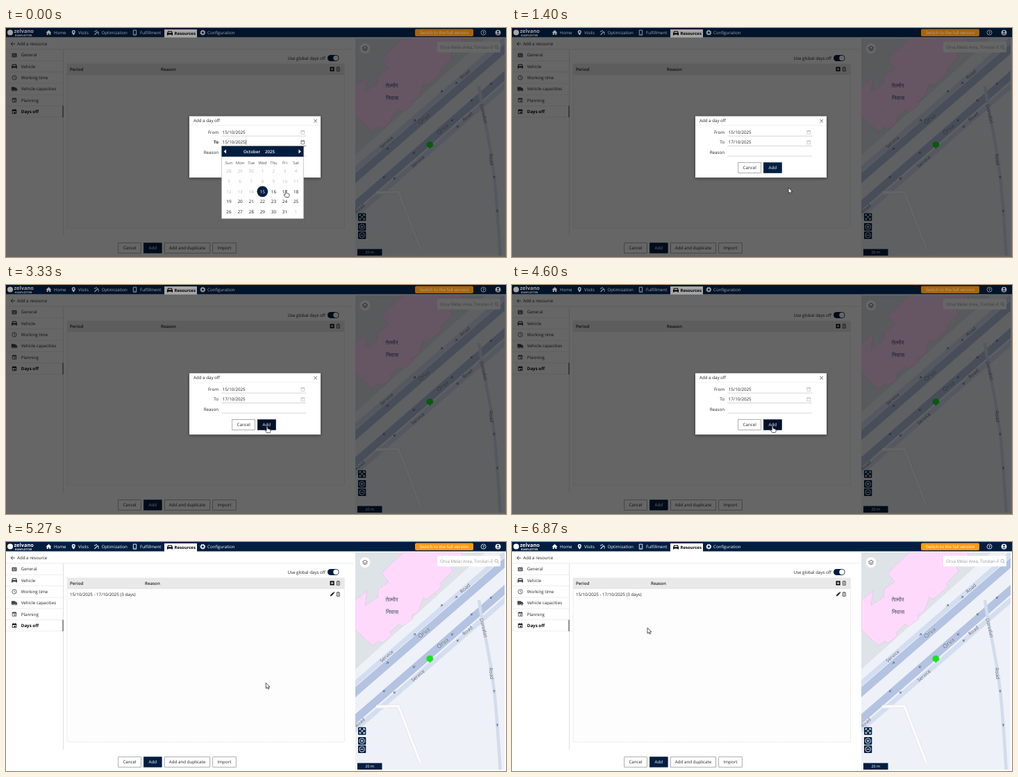
An HTML page for the animation above (8 s loop, 720x331 px).

```html
<!DOCTYPE html>
<html lang="en">
<head>
<meta charset="utf-8">
<title>Days off</title>
<style>
html, body { margin: 0; width: 100%; height: 100%; overflow: hidden; background: #fff; }
svg { display: block; width: 100%; height: 100%; }
text { font-family: "Open Sans", "Noto Sans", sans-serif; text-rendering: geometricPrecision; white-space: pre; }
</style>
</head>
<body>
<svg id="stage" viewBox="0 0 720 331">
  <defs>
    <clipPath id="mapClip"><rect x="503" y="15" width="215" height="314"/></clipPath>
    <clipPath id="searchClip"><rect x="621" y="20" width="80" height="16"/></clipPath>
    <filter id="soft" x="-10%" y="-20%" width="120%" height="140%"><feGaussianBlur stdDeviation="2"/></filter>
  </defs>
</svg>
<script>
const NS = 'http://www.w3.org/2000/svg';
const NAVY = '#011e41', INK = '#222';
const stage = document.getElementById('stage');

function el(parent, tag, attrs = {}) {
  const node = document.createElementNS(NS, tag);
  for (const key in attrs) node.setAttribute(key, attrs[key]);
  parent.appendChild(node);
  return node;
}
const group = (parent, attrs) => el(parent, 'g', attrs);
const rect = (p, x, y, width, height, fill, more) => el(p, 'rect', { x, y, width, height, fill, ...more });
const circle = (p, cx, cy, r, fill, more) => el(p, 'circle', { cx, cy, r, fill, ...more });
const path = (p, d, fill, more) => el(p, 'path', { d, fill, ...more });
const stroke = (p, d, color, width = 0.7, more) =>
  path(p, d, 'none', { stroke: color, 'stroke-width': width, ...more });

// y is the visual middle of the line
function text(p, x, y, str, { size = 6.2, fill = INK, ...more } = {}) {
  const node = el(p, 'text', { x, y: y + size * 0.36, 'font-size': size, fill, ...more });
  node.textContent = str;
  return node;
}
const mid = { 'text-anchor': 'middle' };
const end = { 'text-anchor': 'end' };
const bold = { 'font-weight': 700 };
const semi = { 'font-weight': 600 };

function button(p, x, y, w, h, label, solid) {
  const box = rect(p, x + 0.25, y + 0.25, w - 0.5, h - 0.5, solid ? NAVY : '#fff',
    { stroke: solid ? NAVY : '#777', 'stroke-width': 0.6 });
  text(p, x + w / 2, y + h / 2, label, { fill: solid ? '#fff' : INK, ...mid });
  return box;
}
function trash(p, x, y) {
  stroke(p, `M${x - 2.6} ${y - 2.2}h5.2M${x - 1} ${y - 3}h2M${x - 2} ${y - 1.6}v4.5h4v-4.5M${x} ${y - 1}v3`, '#333', 0.8);
}
function calIcon(p, x, y, color) {
  return stroke(p, `M${x - 2.4} ${y - 2}h4.8v4.8h-4.8zM${x - 2.4} ${y - 1}h4.8M${x - 1.3} ${y - 3}v1M${x + 1.3} ${y - 3}v1`, color, 0.55);
}
function car(p, x, y, fill) {
  path(p, `M${x - 4} ${y + 3}v-3.2l1.3-3h5.4l1.3 3v3.2h-1.5v-1h-5v1zM${x - 2.7} ${y - 0.4}h5.4l-.8-1.7h-3.8z`, fill, { 'fill-rule': 'evenodd' });
}

/* ---------- page ---------- */
const page = group(stage);
rect(page, 0, 0, 720, 331, '#fff');

function buildNav(p) {
  rect(p, 0, 0, 720, 13.5, NAVY);
  circle(p, 6, 6.5, 4, '#fff');
  text(p, 11.5, 4.6, 'zelvano', { size: 7.4, fill: '#fff', ...bold });
  text(p, 13, 10.5, 'RUNPLOTTER', { size: 3.7, fill: '#fff', ...bold });
  rect(p, 228, 2, 47, 12, '#fff');
  const items = [[69, 'Home'], [104, 'Visits'], [137.5, 'Optimization'], [193, 'Fulfillment'], [290, 'Configuration']];
  for (const [x, label] of items) text(p, x, 6.7, label, { fill: '#fff', 'font-weight': 500 });
  text(p, 242.5, 7.5, 'Resources', { size: 6, fill: '#000', ...bold });
  path(p, 'M57.5 6.8l4-3.8 4 3.8h-1.2v3.2h-2v-2.3h-1.6v2.3h-2v-3.2z', '#fff');
  path(p, 'M97.3 10.6c-4-4.4-2.8-7.6 0-7.6s4 3.2 0 7.6zM97.3 4.6a1.1 1.1 0 1 0 .1 0z', '#fff', { 'fill-rule': 'evenodd' });
  stroke(p, 'M127.5 9.8l5-5M130 3v2M134 6.8h-2M127 5h2M133 9.5v-1.5', '#fff', 1.1);
  stroke(p, 'M183.3 3.2h4.4v7h-4.4zM184.8 9h1.4', '#fff', 0.9);
  car(p, 236, 7.6, '#000');
  circle(p, 283.3, 6.7, 2.4, 'none', { stroke: '#fff', 'stroke-width': 1.5 });
  circle(p, 283.3, 6.7, 3.5, 'none', { stroke: '#fff', 'stroke-width': 0.9, 'stroke-dasharray': '1.4 1.35' });
  rect(p, 589, 1.5, 84, 10.6, '#ff9b13', { rx: 2 });
  text(p, 631, 6.7, 'Switch to the full version', { fill: '#fff', ...mid });
  circle(p, 687.5, 6.6, 3.5, 'none', { stroke: '#fff', 'stroke-width': 0.8 });
  text(p, 687.5, 6.6, '?', { size: 5.6, fill: '#fff', ...bold, ...mid });
  circle(p, 708.5, 6.6, 3.9, '#fff');
  circle(p, 708.5, 5.4, 1.3, NAVY);
  path(p, 'M706 9a2.6 1.8 0 0 1 5 0z', NAVY);
}

function buildMenu(p) {
  stroke(p, 'M12.8 23h-5.6M9.8 20.3l-2.7 2.7 2.7 2.7', '#222', 0.8);
  text(p, 16, 23.2, 'Add a resource');
  rect(p, 0, 30.5, 500, 0.6, '#ddd');
  rect(p, 82, 31, 0.6, 269, '#ccc');
  const names = ['General', 'Vehicle', 'Working time', 'Vehicle capacities', 'Planning', 'Days off'];
  names.forEach((name, i) => {
    const y = 39.2 + i * 16.27;
    text(p, 21.8, y, name, i === 5 ? { fill: '#000', ...bold } : {});
    rect(p, 0, y + 8, 82, 0.6, '#e2e2e2');
  });
  rect(p, 81.5, 112.5, 1, 16.5, '#333');
  rect(p, 8.5, 36.4, 7, 5.8, '#555', { rx: 0.6 });
  stroke(p, 'M10 38.6h2M10 40.3h4M13 38.2h1.2', '#fff', 0.7);
  car(p, 12, 55.5, '#444');
  circle(p, 12, 71.8, 3.2, 'none', { stroke: '#444', 'stroke-width': 0.8 });
  stroke(p, 'M12 69.8v2.2l1.5 1', '#444', 0.7);
  path(p, 'M7.8 85.3h5v1h1.7l1.7 2v2.2h-8.4z', '#444');
  for (const x of [10, 14.2]) circle(p, x, 90.6, 1.1, '#444', { stroke: '#fff', 'stroke-width': 0.4 });
  for (const [y, c] of [[104.3, '#444'], [120.8, '#000']]) {
    stroke(p, `M9.2 ${y - 2.5}h5.6v5.4h-5.6zM10.5 ${y - 3.4}v1M13.5 ${y - 3.4}v1`, c, 0.8);
    rect(p, 9.2, y - 2.5, 5.6, 1.6, c);
    rect(p, 11.5, y + 0.3, 2, 1.7, c);
  }
}

function buildTable(p) {
  text(p, 460, 43.4, 'Use global days off', end);
  rect(p, 463, 39, 16.5, 9, NAVY, { rx: 4.5 });
  circle(p, 475, 43.5, 3.7, '#fff');
  rect(p, 88, 52, 399.5, 237, '#fdfdfd', { stroke: '#ccc', 'stroke-width': 0.6, 'stroke-dasharray': '1 1' });
  rect(p, 88, 52, 399.5, 15.2, '#e9e9e9');
  rect(p, 88, 66.8, 399.5, 0.6, '#d4d4d4');
  text(p, 92, 59.4, 'Period', semi);
  rect(p, 466.5, 56.3, 6.2, 6.2, '#111', { rx: 0.6 });
  stroke(p, 'M467.7 59.4h3.8M469.6 57.5v3.8', '#fff', 0.9);
  trash(p, 478.3, 59.4);
  button(p, 161.5, 310.5, 33, 15, 'Cancel');
  button(p, 198, 310.5, 26.5, 15, 'Add', true);
  button(p, 228, 310.5, 66, 15, 'Add and duplicate');
  button(p, 297.5, 310.5, 34, 15, 'Import');
}

function buildMap(p) {
  const m = group(p, { 'clip-path': 'url(#mapClip)' });
  rect(m, 503, 15, 215, 314, '#eef1f7');
  path(m, 'M503 15H690L503 184Z', '#dde3e6');
  path(m, 'M503 84L520 71L517 92L535 80L536 68L551 58L541 45L572 15H656L658 22L640 37L643 42L625 60L628 64L606 83L601 80L594 100L584 106L586 111L571 122L566 118L553 131L555 135L542 146L536 143L528 150L503 127Z',
    '#ffd9fb', { stroke: '#e6bfe4', 'stroke-width': 0.6 });
  // diagonal roads, given by their height at x = 602
  const slope = -0.87;
  const road = (y, color, w) => stroke(m, `M490 ${y - 112 * slope}L730 ${y + 128 * slope}`, color, w);
  road(118, '#d5def0', 7);
  road(185, '#d5def0', 7);
  road(131, '#b3c3e1', 11);
  road(170, '#b3c3e1', 11);
  stroke(m, 'M681 84Q685 112 692 146T703 215T712 335', '#d3dcec', 4.5);
  stroke(m, 'M533 238L565 237L597 320', '#dfe2e7', 5);
  stroke(m, 'M533 238L565 237L597 320', '#fbfbfb', 3.6);

  const arrow = (x, y, a) => stroke(m, 'M-2 0h4M.4 -1.6l1.6 1.6-1.6 1.6', '#5d6c8c', 0.8,
    { transform: `translate(${x} ${y}) rotate(${a})` });
  [[627, 92], [549, 175], [648, 80], [588, 134], [699, 33]].forEach(([x, y]) => arrow(x, y, -41));
  [[671, 104], [643, 133], [588, 180], [545, 215], [560, 217], [651, 142], [699, 80]].forEach(([x, y]) => arrow(x, y, 139));
  arrow(703, 216, -96);
  arrow(707.5, 265, -94);

  const label = (x, y, a, str, size = 7) => text(m, 0, 0, str,
    { size, fill: '#46536b', stroke: '#f4f6fa', 'stroke-width': 0.6, 'paint-order': 'stroke', transform: `translate(${x} ${y}) rotate(${a})`, ...mid });
  label(548, 165, -41, 'Service');
  label(601.5, 131, -41, 'Orva', 8.6);
  label(661, 67, -41, 'Road');
  label(593, 193, -41, 'Service');
  label(628.5, 146, -41, 'Orva', 8.6);
  label(664.5, 128, -41, 'Road');
  label(509.5, 261, -41, 'Road');
  label(688, 124, 76, 'Dorvalas');
  label(699, 190, 84, 'Road');
  const hindi = { size: 8.4, fill: '#45506a', 'font-family': '"Noto Sans", "Noto Sans Devanagari", sans-serif', ...mid };
  text(m, 555.5, 83, 'तेल्मोर', hindi);
  text(m, 556, 101, 'निवास', hindi);

  path(m, 'M610.3 174.2l-2.4-2.2-2.1-1.2.2-4.2 2.5-2h3.8l2.4 2 .2 4-2.2 1.4z', '#14e619', { stroke: '#0fbf14', 'stroke-width': 0.4 });

  circle(m, 517, 29.5, 8, '#fff', { stroke: '#ccc', 'stroke-width': 0.5 });
  stroke(m, 'M513.4 28.5l3.6-2.3 3.6 2.3-3.6 2.3zM513.4 30.6l3.6 2.3 3.6-2.3', '#444', 0.8);
  rect(m, 621, 20, 91, 15.2, '#fff', { rx: 1.5 });
  const search = group(m, { 'clip-path': 'url(#searchClip)' });
  text(search, 625, 27.7, 'Orva Melai Area, Tondari-East', { fill: '#999' });
  circle(m, 706, 27.2, 2.1, 'none', { stroke: '#999', 'stroke-width': 0.7 });
  stroke(m, 'M707.5 28.8l2 2', '#999', 0.8);
  for (const y of [267.7, 282, 294]) rect(m, 507, y, 11.3, 11, NAVY, { rx: 1 });
  stroke(m, 'M509 272v-2.4h2.4M514 269.6h2.4v2.4M516.4 274.4v2.4h-2.4M511.4 276.8h-2.4v-2.4M509.2 269.8l7 6.8M516.2 269.8l-7 6.8', '#fff', 0.9);
  for (const y of [287.5, 299.5]) {
    circle(m, 512.6, y, 3.8, 'none', { stroke: '#fff', 'stroke-width': 0.9 });
    stroke(m, `M510.5 ${y}h4.2`, '#fff', 0.9);
  }
  stroke(m, 'M512.6 285.4v4.2', '#fff', 0.9);
  rect(m, 506, 319.5, 35.5, 9.5, NAVY);
  text(m, 523.8, 324.4, '20 m', { size: 5.4, fill: '#fff', ...mid });
}

buildNav(page);
buildMenu(page);
buildTable(page);
buildMap(page);
const reasonHead = text(page, 223, 59.4, 'Reason', semi);
const row = group(page);
text(row, 92, 75.4, '15/10/2025 - 17/10/2025 (3 days)');
path(row, 'M466.8 78.5l.4-1.9 3.8-3.8 1.5 1.5-3.8 3.8zM471.4 72.4l.7-.6 1.4 1.4-.6.7z', INK);
trash(row, 478.3, 75.4);

/* ---------- dialog ---------- */
const modal = group(stage);
rect(modal, 0, 0, 720, 13.5, '#000', { opacity: 0.35 });
rect(modal, 0, 13.5, 720, 317.5, '#000', { opacity: 0.6 });
rect(modal, 264, 128.5, 189, 88.7, '#000', { opacity: 0.5, filter: 'url(#soft)' });
rect(modal, 264, 127.5, 189, 88.7, '#fff');
rect(modal, 264, 140, 189, 0.5, '#e4e4e4');
text(modal, 270, 134, 'Add a day off');
stroke(modal, 'M443.3 132l4.6 4.6M447.9 132l-4.6 4.6', '#333', 0.7);
text(modal, 306, 150.5, 'From', end);
const toLabel = text(modal, 306, 165.2, 'To', end);
text(modal, 306, 179.7, 'Reason', end);
text(modal, 311.8, 150.5, '15/10/2025');
const toValue = text(modal, 311.8, 165.2, '');
const caret = rect(modal, 345, 161.5, 0.6, 7, '#000');
for (const y of [155.8, 184.8]) rect(modal, 310.5, y, 121.5, 0.6, '#bbb');
const toLine = rect(modal, 310.5, 170.3, 121.5, 0.6, '#bbb');
calIcon(modal, 427.3, 150.5, '#aaa');
const toIcon = calIcon(modal, 427.3, 165, '#aaa');
button(modal, 325.5, 194.4, 33.3, 15.3, 'Cancel');
const addBox = button(modal, 362, 194.4, 26.7, 15.3, 'Add', true);

/* ---------- date picker ---------- */
const picker = group(stage);
rect(picker, 310.5, 171, 118, 104.6, '#fff', { stroke: '#aaa', 'stroke-width': 0.6 });
rect(picker, 310.5, 171, 118, 15, NAVY);
text(picker, 354, 178.7, 'October', { fill: '#fff', ...semi, ...mid });
text(picker, 380, 178.7, '2025', { fill: '#fff', ...semi, ...mid });
path(picker, 'M317 175.5v6l-3.3-3zM421.5 175.5v6l3.3-3z', '#fff');
const colX = i => 321 + 16.1 * i;
['Sun', 'Mon', 'Tue', 'Wed', 'Thu', 'Fri', 'Sat'].forEach((d, i) =>
  text(picker, colX(i), 194.5, d, { size: 5.9, fill: '#555', ...mid }));
const discs = [3, 5].map(i => circle(picker, colX(i), 236.3, 7.9, NAVY));
const days = {};
for (let i = 0; i < 35; i++) {
  const n = i - 2;
  const num = n < 1 ? n + 30 : n > 31 ? n - 31 : n;
  const active = n >= 15 && n <= 31;
  const t = text(picker, colX(i % 7), 206.7 + Math.floor(i / 7) * 14.8, num,
    { size: 6.4, fill: active ? INK : '#bdbdbd', ...mid });
  if (active) days[n] = t;
}
const today = rect(picker, 365.6, 239.2, 7.2, 0.5, INK);

/* ---------- pointer ---------- */
const arrowCur = path(stage, 'M0 0V8.2L1.9 6.5L3.1 9.2L4.5 8.6L3.3 6H5.8Z', '#fff', { stroke: '#111', 'stroke-width': 0.7 });
const handCur = path(stage, 'M-.9 .8Q0-.6 .9 .8V3.5Q2 3 2.3 3.9Q3.5 3.5 3.8 4.5Q5 4.3 5 5.5V7.2Q4.8 8.5 4 9.3H-.4L-3 5.9Q-2.5 4.7-.9 6Z',
  '#fff', { stroke: '#111', 'stroke-width': 0.7, 'stroke-linejoin': 'round' });

/* ---------- timeline ---------- */
const clamp = v => Math.max(0, Math.min(1, v));
const span = (t, a, b) => clamp((t - a) / (b - a));
const swing = p => 0.5 - Math.cos(p * Math.PI) / 2;
const easeOut = p => 1 - (1 - p) ** 2;
const linear = p => p;
const MOVES = [
  [1333, 2200, 401.5, 235.3, 378.5, 205, easeOut],
  [2267, 2333, 378.5, 205, 376, 204.4, linear],
  [4533, 4667, 376, 204.4, 374.3, 203.6, linear],
  [6000, 6267, 374.3, 203.6, 284, 158.5, swing],
  [6600, 6867, 284, 158.5, 195, 124, swing]
];
function pointer(t) {
  let pos = t < 1000 ? [403, 235.3] : [401.5, 235.3];
  for (const [a, b, x0, y0, x1, y1, ease] of MOVES) {
    if (t <= a) break;
    const k = ease(span(t, a, b));
    pos = [x0 + (x1 - x0) * k, y0 + (y1 - y0) * k];
  }
  return pos;
}
const set = (node, name, v) => node.setAttribute(name, v);
const show = (node, on) => set(node, 'display', on ? 'inline' : 'none');

function draw(ms) {
  // the picture advances in 1/15 s steps
  const t = Math.floor(ms * 0.015 + 0.1) / 0.015;
  const open = t < 5260;
  const picked = t > 520;

  show(modal, open);
  show(row, !open);
  set(reasonHead, 'x', open ? 223 : 200);

  toValue.textContent = picked ? '17/10/2025' : '15/10/2025';
  set(toLabel, 'font-weight', picked ? 400 : 700);
  show(caret, !picked);
  set(toLine, 'fill', picked ? '#bbb' : '#333');
  set(toIcon, 'stroke', picked ? '#aaa' : '#333');

  const sel = span(t, 333, 533);
  set(discs[0], 'opacity', 1 - sel);
  set(discs[1], 'opacity', sel);
  set(days[15], 'fill', sel < 0.5 ? '#fff' : INK);
  set(days[17], 'fill', sel < 0.5 ? INK : '#fff');
  show(today, sel > 0.5);
  const fade = swing(span(t, 600, 1000));
  show(picker, fade < 0.999);
  set(picker, 'opacity', 1 - fade);
  set(picker, 'transform', `translate(0 171) scale(1 ${1 - 0.43 * fade}) translate(0 -171)`);

  const [x, y] = pointer(t);
  const onAdd = open && t > 1000 && x > 362 && x < 389 && y < 209.5;
  const fill = t > 5060 ? '#000' : onAdd ? '#01112a' : NAVY;
  set(addBox, 'fill', fill);
  set(addBox, 'stroke', fill);
  const hand = onAdd || t < 990;
  show(handCur, hand);
  show(arrowCur, !hand);
  set(hand ? handCur : arrowCur, 'transform', `translate(${x} ${y})`);
}

const start = performance.now();
function tick() {
  draw((performance.now() - start) % 8000);
  requestAnimationFrame(tick);
}
tick();
</script>
</body>
</html>
```
